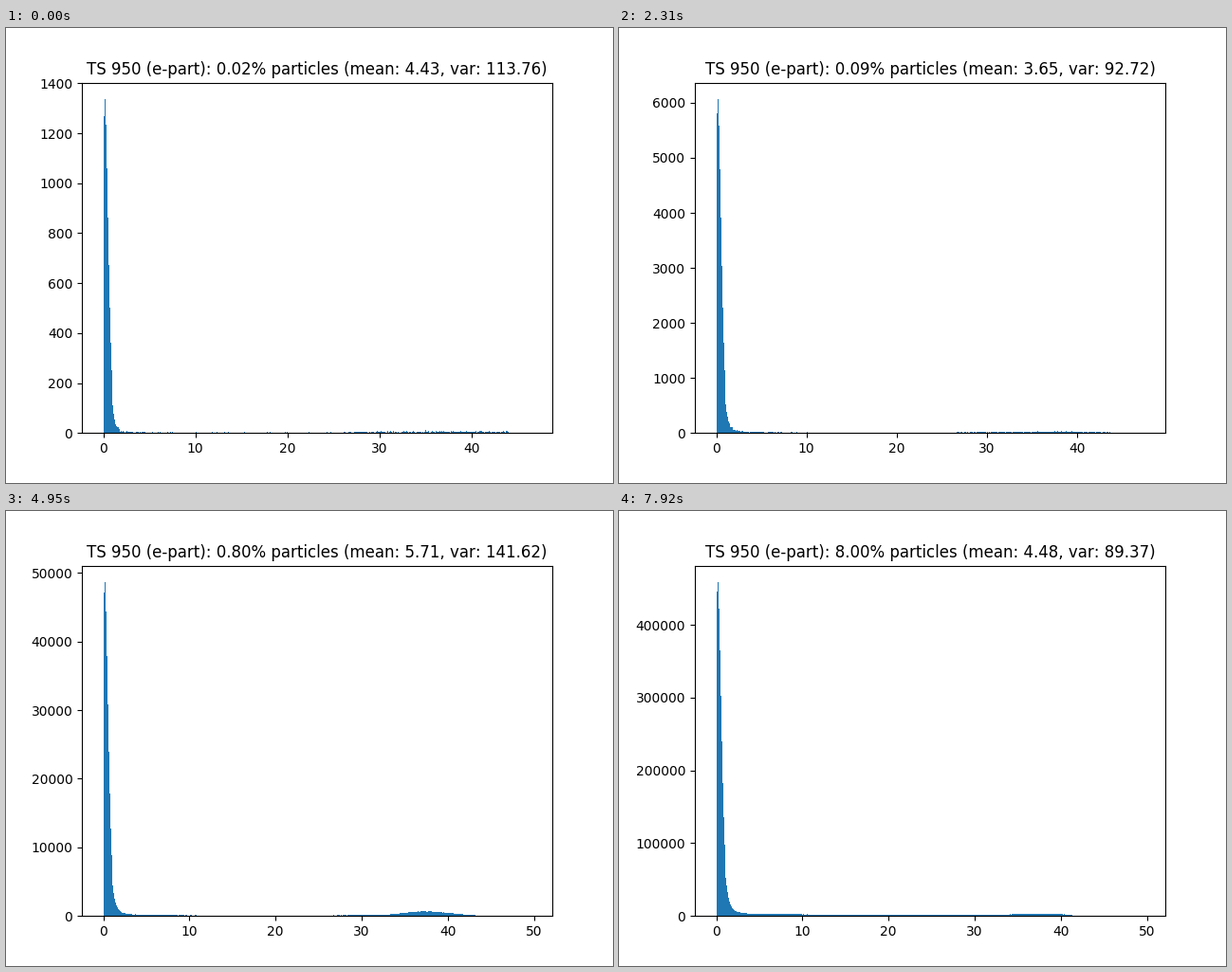
Animation, 640 px wide and 480 px high, one loop 8000 ms. Source, as a matplotlib script:

```python
import numpy as np
import matplotlib.pyplot as plt
from matplotlib.animation import FuncAnimation

INTERVAL, LOOP, HOLD = 40, 8000, 330
BINS = 500
AXIS_PX = 369.6

# Share of particles drawn in each step: 0.02..0.09, 0.1..0.9, 1..8 percent
SHARES = [d * s for s, first, last in ((0.01, 2, 9), (0.1, 1, 9), (1, 1, 8))
          for d in range(first, last + 1)]

# Key points; the steps between them are interpolated
KEYS = [0, 5, 9, 12, 18, 22, 24]
MEANS = [4.43, 3.50, 3.79, 5.21, 6.22, 5.37, 4.48]
VARS = [113.76, 89.65, 95.79, 131.75, 151.48, 111.17, 89.37]
PEAKS = [66800, 68060, 66700, 63070, 58500, 56300, 57340]  # per percent

# The largest value seen so far grows at a few steps
RISES = [1, 3, 11, 15]
X_MAX = [46.45, 47.0, 47.45, 48.55, 49.65]


def at(step, values):
    return np.interp(step, KEYS, values)


def ramp(x, start, width):
    return 1 / (1 + np.exp(-(x - start) / width))


def bell(x, centre, width):
    return np.exp(-((x - centre) / width) ** 2)


def tail_px(x, g):
    """Expected bar height in pixels away from the peak; g runs from 0 to 1."""
    near = 1.3 * min(1, 0.3 + 2 * g) * np.exp(-(x - 2.5) / 5)
    floor = 0.22 + 1.2 * g ** 4
    shelf = 0.9 * (1 - g) * ramp(x, 26.5, 0.5)
    bump = (0.4 + 4.2 * bell(g, 0.68, 0.19)) * bell(x, 37.5, 3.6)
    return (near + floor + shelf + bump) * ramp(-x, 2.8 * g ** 3 - 44, 0.25)


def histogram(step):
    rng = np.random.default_rng(950 + step)
    edges = np.linspace(0, X_MAX[np.searchsorted(RISES, step, "right")], BINS + 1)
    x = (edges[:-1] + edges[1:]) / 2
    peak = at(step, PEAKS) * SHARES[step]
    level = np.log10(SHARES[step])
    g = np.log(SHARES[step] / SHARES[0]) / np.log(SHARES[-1] / SHARES[0])

    core = np.exp((0.25 * level - 2.9) * np.abs(x - 0.22) ** 1.64)
    core *= peak / core.max()
    shoulder = (0.0185 + 0.005 * level) * np.exp(-(x - 1.5) / 0.6)
    rest = ramp(x, 1.2, 0.1) * (shoulder + 1.05 * tail_px(x, g) / AXIS_PX)
    return core + rng.poisson(peak * rest), edges, peak


def title(step):
    return (f"TS 950 (e-part): {SHARES[step]:.2f}% particles "
            f"(mean: {at(step, MEANS):.2f}, var: {at(step, VARS):.2f})")


plt.rcParams["text.kerning_factor"] = 6
steps = [histogram(i) for i in range(len(SHARES))]

fig, ax = plt.subplots(figsize=(6.4, 4.8), dpi=100)
bars = ax.stairs(steps[0][0], steps[0][1], fill=True, facecolor="C0")
bars.set_snap(True)
heading = ax.set_title("")


def update(frame):
    step = (frame * INTERVAL + INTERVAL - 1) // HOLD
    counts, edges, peak = steps[step]
    bars.set_data(counts, edges)
    ax.set_xlim(-0.05 * edges[-1], 1.05 * edges[-1])
    ax.set_ylim(0, 1.05 * peak)
    heading.set_text(title(step))
    return bars, heading


anim = FuncAnimation(fig, update, frames=LOOP // INTERVAL, interval=INTERVAL,
                     repeat=True, repeat_delay=0, blit=False)
plt.show()
```
